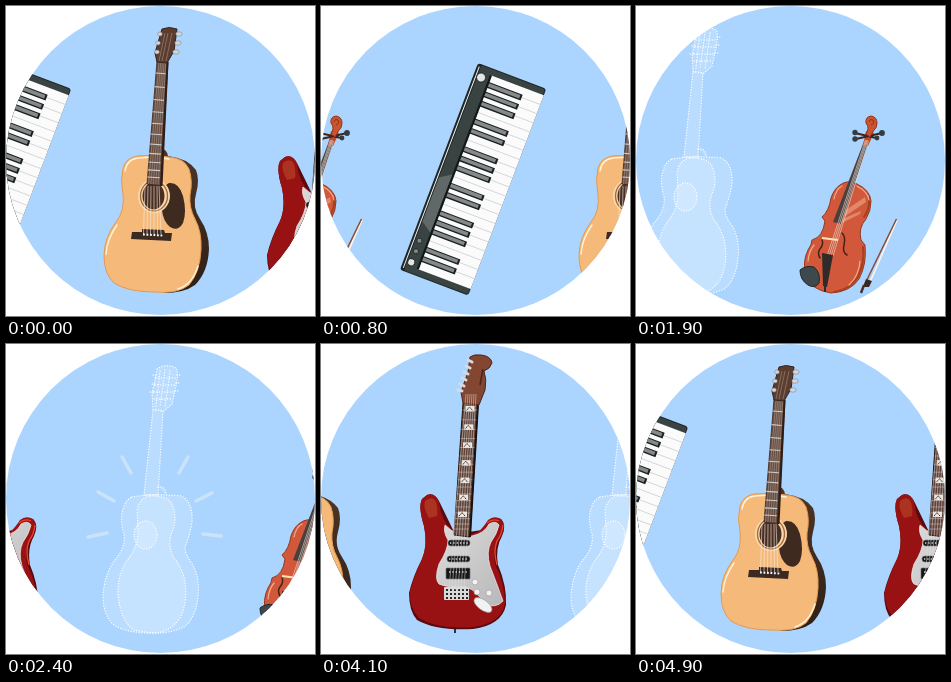
An HTML page for the animation above (5000 ms loop, 309 by 310 pixels).

```html
<!DOCTYPE html>
<html lang="en">
<head>
<meta charset="utf-8">
<title>Instrument carousel</title>
<style>
html, body { margin: 0; width: 100%; height: 100%; overflow: hidden; background: #fff; }
svg { display: block; width: 100vw; height: 100vh; }
</style>
</head>
<body>
<svg viewBox="0 0 309 310" fill="none" stroke-linejoin="round">
<defs>
  <clipPath id="disc"><circle cx="154.5" cy="154.5" r="154.5"/></clipPath>
  <linearGradient id="side" x2="0" y2="1"><stop stop-color="#4f3626"/><stop offset="1" stop-color="#2e1f17"/></linearGradient>
  <linearGradient id="guard" x2="1" y2="1"><stop stop-color="#dcdcdc"/><stop offset="1" stop-color="#b8b8ba"/></linearGradient>
</defs>
<g clip-path="url(#disc)">
  <rect width="309" height="310" fill="#abd5ff"/>

  <g id="acoustic">
    <path fill="url(#side)" d="M154 142Q161 143 162 150Q181 152 190 164Q194 174 190 188Q186 201 194 213Q203 226 203 243Q202 266 189 279Q178 287 158 287L150 200Z"/>
    <path fill="#f5b97a" stroke="#e39a50" stroke-width="1" d="M131 150Q148 148 163 151Q178 152 183 163Q187 175 184 189Q183 202 189 213Q196 226 195 244Q194 266 183 279Q172 288 148 286Q122 286 108 277Q98 268 98 250Q98 232 110 216Q119 205 117 188Q114 174 117 162Q120 152 131 150Z"/>
    <path stroke="#fff3d8" stroke-width="1.4" stroke-linecap="round" d="M119 165Q121 153 132 152Q148 150 163 153M100 248Q101 233 111 219M172 283Q186 279 192 260"/>
    <path fill="#3f2a20" d="M163 177Q173 176 177 190Q181 206 177 217Q172 226 164 221Q157 215 156 204Q160 190 160 179Z"/>
    <ellipse cx="148" cy="190" rx="16" ry="17" fill="#f8d9ab"/>
    <ellipse cx="148" cy="190" rx="13.5" ry="15" stroke="#a56a42" stroke-width="1.4"/>
    <ellipse cx="147.500" cy="190" rx="11" ry="13.500" fill="#4a2e22"/>
    <path fill="#684c40" stroke="#3b2820" stroke-width=".8" d="M151 55L162 56L155 180L141 178Z"/>
    <path fill="#2f1d16" d="M160.500 56L162.500 56L156.500 180L154 180Z"/>
    <path id="strings" stroke="#d8d0c8" stroke-opacity=".65" stroke-width=".5"/>
    <path id="frets" stroke="#c8cccc" stroke-width="1.1"/>
    <path fill="#5b3d30" stroke="#35231b" d="M156 23Q163 20 171 23L168 45L161 57L151 56L149 47Z"/>
    <path stroke="#9a8476" stroke-width=".7" d="M159 27L153 55M162 27L156 55M166 27L160 55"/>
    <g fill="#d4d6d8" stroke="#777" stroke-width=".5">
      <ellipse cx="154" cy="28" rx="2.4" ry="2"/><ellipse cx="152" cy="37" rx="2.4" ry="2"/><ellipse cx="151" cy="46" rx="2.4" ry="2"/>
      <ellipse cx="173" cy="28" rx="3.2" ry="2.2"/><ellipse cx="172" cy="37" rx="3.2" ry="2.2"/><ellipse cx="170" cy="46" rx="3.2" ry="2.2"/>
    </g>
    <path fill="#3b2a22" d="M136 223L158 224L159 227L166 227L165 235L125 233L126 226L136 226Z"/>
    <path stroke="#f4ece2" stroke-width=".6" d="M139 180L137.500 228M142 180L141 228M145 180L144.500 228M148 180L148 228M151 180L151.500 228M153 180L155 228"/>
    <path stroke="#fff" stroke-width="2" stroke-dasharray="1.8 1.7" d="M137 228.500L157 229.500"/>
  </g>

  <g id="keyboard"><g transform="translate(157 57) rotate(20.7)">
    <rect width="73" height="221" rx="3" fill="#1f2626"/>
    <rect x="4" y="1" width="68" height="219" rx="2" fill="#394342"/>
    <path stroke="#f1f4f4" stroke-width="1" d="M2.500 3V218"/>
    <path fill="#fff" fill-opacity=".2" d="M4 121L16 113V176L4 168Z"/>
    <rect x="17" y="7" width="56" height="207" fill="#fbfbfb"/>
    <path id="gaps" stroke="#cfd1d2" stroke-width=".8"/>
    <g id="sharps"></g>
    <path stroke="#111817" stroke-width="2.200" d="M16.500 7V214"/>
    <g fill="#e4e6e6" stroke="#161b1b" stroke-width=".7">
      <circle cx="8" cy="12.500" r="4.500"/><circle cx="8" cy="210" r="3.500"/>
      <g fill="#7f8786"><circle cx="8.500" cy="198" r="2.500"/><circle cx="8" cy="187" r="2.500"/></g>
    </g>
  </g></g>

  <g id="violin">
    <path fill="#d1583a" stroke="#93371f" stroke-width="1" d="M124 179Q132 173 141 178Q154 184 155 195Q155 205 150 213Q142 222 145 234L149 239Q151 258 143 273Q134 286 115 287Q95 284 90 270Q86 256 92 244Q96 238 96 234Q107 231 109 215L106 211Q113 205 115 192Q118 183 124 179Z"/>
    <path stroke="#a5401f" stroke-width="2" stroke-linecap="round" d="M153 192Q154 203 148 211M147 241Q149 258 141 272Q133 284 118 286"/>
    <path fill="#eaa084" fill-opacity=".65" d="M130 204L149 191L150 196L128 211ZM126 213L145 205L144 208L124 218Z"/>
    <path stroke="#f4ab88" stroke-width="1.200" stroke-linecap="round" d="M118 193Q120 183 126 180M141 180Q152 186 153 194M92 255Q93 245 98 239M144 255Q143 270 133 279"/>
    <path stroke="#472116" stroke-width="1.500" stroke-linecap="round" d="M106 234Q108 238 104 243Q101 247 104 252M126 227Q130 231 128 239Q126 246 131 249"/>
    <path fill="#4a3f3c" d="M148.500 134L153 135L125 218L117 216Z"/>
    <path fill="#b94c2a" d="M150 125L158 127L152 140L147 139Z"/>
    <path stroke="#40241c" stroke-width="1.800" d="M139 127L160 132M140 133L166 127"/>
    <g fill="#303d42"><circle cx="139" cy="126.500" r="2.700"/><circle cx="139" cy="133" r="2.700"/><circle cx="166" cy="127" r="2.900"/><circle cx="161" cy="132" r="2.400"/></g>
    <path fill="#c9542f" stroke="#943219" d="M150 128Q154 122 150 117Q149 111 155 110Q161 111 161 117Q161 122 158 124L154 131Z"/>
    <path stroke="#8d301a" d="M153 116Q154 112 157 114Q159 118 155 119"/>
    <path stroke="#e5ded7" stroke-width=".6" d="M149.500 134L111 250M150.500 134L113 250M151.500 134L115 250M152.500 135L117 250"/>
    <path stroke="#ffe2b3" stroke-width="2.200" d="M106 232L122 234"/>
    <path fill="#302a29" d="M106 247L117 249L111 281L107 280Z"/>
    <path stroke="#302a29" stroke-width="2" d="M109 277L109 286"/>
    <path fill="#3d494c" stroke="#20282a" d="M84 264Q90 259 98 261Q105 267 103 277Q99 283 92 279Q84 274 84 264Z"/>
    <path stroke="#fff5e7" stroke-width="1.600" d="M181 214L154 276"/>
    <path stroke="#8c4a34" stroke-width="1.500" d="M180.500 213L145 286"/>
    <path fill="#352722" d="M150 273L156 275L153 281L147 281Z"/>
    <path stroke="#4a3029" stroke-width="2.400" d="M148 279L145 287"/>
  </g>

  <g id="ghost">
    <g fill="#fff" fill-opacity=".17" stroke="#fff" stroke-width="1.300" stroke-linecap="round" stroke-dasharray=".1 2.600">
      <path d="M151 25Q160 19 170 24Q173 28 170 42L166 60L158 67L147 65L146 50Z"/>
      <path d="M147 66L157 67L152 151L138 151Z"/>
      <path d="M152 143Q160 142 160 151"/>
      <path d="M126 153Q147 149 175 152Q187 157 186 178Q183 194 179 203Q179 211 187 221Q194 235 192 252Q190 274 178 283Q163 290 145 289Q120 289 108 281Q97 271 97 252Q98 232 108 217Q120 204 118 190Q113 174 118 162Q120 156 126 153Z"/>
      <path d="M143 152Q133 155 131 166Q132 181 132 190Q131 204 122 215Q111 231 112 251Q115 278 128 286L145 289Q164 289 174 274Q183 256 178 233Q174 221 168 214Q161 201 166 188Q172 174 166 160Q161 151 143 152Z"/>
      <ellipse cx="139.500" cy="191" rx="11.500" ry="14"/>
      <path fill="none" d="M154 27L150 62M159 26L154 63M164 27L159 63M150 34H170M149 41H169M148 48H167M148 55H166M171 31H174M170 39H173M169 47H172M150 31H147M149 40H146M147 48H144"/>
    </g>
  </g>

  <g id="electric">
    <path fill="#5a090c" d="M106 151Q114 148 119 159L134 190L161 186Q171 172 180 175Q186 181 181 192Q174 204 177 221Q186 242 185 261Q181 281 152 285Q115 287 96 276Q88 267 88 249Q92 232 101 215Q107 201 103 182Q97 163 101 155Z"/>
    <path fill="#981214" d="M106 151Q114 148 118 158Q120 177 132 187Q144 194 157 188Q162 184 167 176Q173 171 180 175Q185 180 181 190Q171 204 174 220Q184 240 184 260Q180 279 153 283Q117 286 98 274Q88 264 89 247Q93 232 101 215Q107 201 103 182Q97 163 101 155Z"/>
    <path fill="#c4552f" fill-opacity=".5" d="M104 157Q111 151 115 158Q117 166 116 172L108 174Q102 164 104 157Z"/>
    <path stroke="#e4442f" stroke-width="1.300" d="M182 181Q181 190 176 197Q172 207 176 221M166 179Q172 174 178 177"/>
    <path fill="url(#guard)" stroke="#eee" stroke-width=".7" d="M124 181Q136 193 151 192Q164 189 168 180Q175 176 178 181Q176 190 170 198Q165 208 169 222Q176 240 182 257Q175 265 163 260Q157 247 145 243Q127 244 118 240Q113 235 118 220Q127 206 127 196Q122 188 124 181Z"/>
    <path fill="#5e4036" stroke="#24140f" d="M142 59L157 60L149 193L133 191Z"/>
    <path stroke="#1c100d" stroke-width="2" d="M157 60L149 193"/>
    <path id="efrets" stroke="#b5a39a" stroke-width=".7"/>
    <g id="inlays"></g>
    <path fill="#834631" stroke="#4a2419" d="M149 13Q153 10 160 11Q170 12 171 19Q169 25 163 27Q166 36 164 46L158 61L142 59L140 48L147 28Z"/>
    <path stroke="#4a2419" stroke-width="1.500" d="M162 25L159 41"/>
    <path stroke="#d9dadb" stroke-width="3" stroke-linecap="round" d="M147 16L151 18M145 22L149 24M143 28L147 30M141 34L145 36M139 40L143 42M137 46L141 47"/>
    <g fill="#171717" stroke="#6f6f70" stroke-width=".6">
      <rect x="127" y="196" width="22" height="6" rx="3"/>
      <rect x="126" y="212" width="23" height="6" rx="3"/>
      <rect x="125" y="224" width="24" height="11" rx="1"/>
    </g>
    <path stroke="#d6d6d6" stroke-width="1.300" stroke-dasharray="1.300 2" d="M129 199H147M128 215H147M128 228H147"/>
    <rect x="123" y="243" width="25" height="13" rx="1" fill="#d9d9d9"/>
    <path stroke="#282828" stroke-width="2" stroke-dasharray="2 2" d="M125 246H147M125 250H147M125 254H147"/>
    <path stroke="#ddd" stroke-width=".5" d="M145 50L128 246M147 50L131 246M149 50L134 246M151 50L137 246M153 50L140 246M155 50L143 246"/>
    <g fill="#f2f2f2" stroke="#999" stroke-width=".6">
      <circle cx="154" cy="238" r="3"/><circle cx="156" cy="248" r="3"/><circle cx="168" cy="249" r="3"/>
      <ellipse cx="162" cy="261" rx="10.500" ry="5" transform="rotate(36 162 261)"/>
    </g>
    <path stroke="#222" stroke-width="1.800" d="M134 283V289"/>
  </g>

  <path id="rays" stroke="#cbe3f9" stroke-width="3.500" stroke-linecap="round" d="M116 113L125 129M92 148L108 157M82 193L101 189M182 113L173 129M206 149L190 157M215 192L197 190"/>
</g>
</svg>
<script>
const el = id => document.getElementById(id);
const range = (n, f) => Array.from({ length: n }, (_, i) => f(i)).join('');

el('frets').setAttribute('d', range(11, i => {
  const y = 67 + i * (14 - i * .36), x = 150.5 - (y - 56) * .08;
  return `M${x} ${y}l${10 + i * .25} .8`;
}));
el('strings').setAttribute('d', range(5, i => `M${153 + i * 1.7} 56L${142.5 + i * 2.4} 178`));
el('gaps').setAttribute('d', range(20, i => `M17 ${16.8 + i * 9.8}H73`));
el('sharps').innerHTML = range(3, octave => [17, 27, 37, 56, 66].map(y => {
  const top = y + octave * 68.5 - 3;
  return `<rect x="17" y="${top}" width="36" height="6" fill="#1b2020"/>` +
    `<rect x="17" y="${top + 1}" width="34" height="3.6" fill="#858989"/>`;
}).join(''));
el('efrets').setAttribute('d', range(17, i => {
  const y = 66 + i * (10 - i * .16);
  return `M${142 - (y - 60) * .068} ${y}h14.500`;
}));
el('inlays').innerHTML = range(7, i => {
  const y = 62 + i * 18.5 - i * i * .15, x = 144.5 - i * 1.25;
  return `<rect x="${x}" y="${y}" width="9" height="5.500" fill="#ece8e2"/>` +
    `<path d="M${x + 1} ${y + 4.5}l3 -3.500 3 3.500" stroke="#54342a"/>`;
});

const LOOP = 796, SPEED = 20, PAUSE = 24, REST = 470;
// Travel at which each instrument sits in its drawn place
const home = { acoustic: 0, keyboard: 160, violin: 300, ghost: REST, electric: 623 };

function stepAt(t) {
  const n = Math.floor(t / 100);
  return n < PAUSE ? n : Math.max(PAUSE, n - 9);
}

// Steady travel, with shorter steps into and out of the rest
function travel(n) {
  if (n === PAUSE) return REST;
  return n * SPEED - (n > PAUSE ? 17 : 0);
}

function draw(now) {
  const n = stepAt(now % 5000), x = travel(n);
  for (const id in home) {
    const dx = (x - home[id] + LOOP * 1.5) % LOOP - LOOP / 2;
    el(id).setAttribute('transform', `translate(${dx})`);
  }
  el('rays').style.display = n === PAUSE ? '' : 'none';
}

const start = performance.now();
function tick() {
  draw(performance.now() - start);
  requestAnimationFrame(tick);
}
tick();
</script>
</body>
</html>
```
